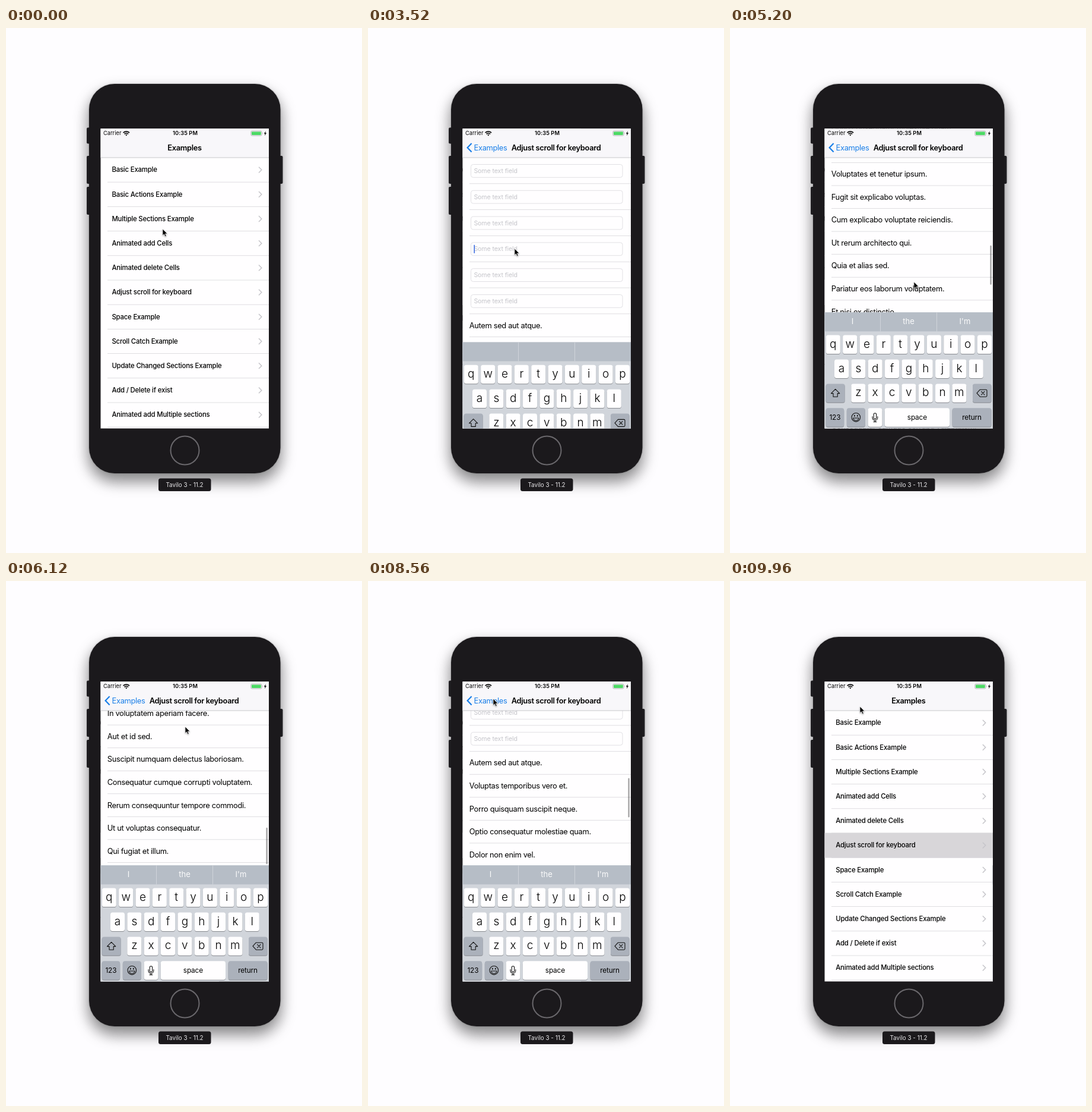
Write an HTML page that moves like this. It is 600 px wide and 883 px high and loops after 10 s.

```html
<!DOCTYPE html>
<html lang="en">
<head>
<meta charset="utf-8">
<title>Keyboard scroll demo</title>
<style>
  html, body { margin: 0; width: 100%; height: 100%; overflow: hidden; background: #fefdff; }
  svg { display: block; width: 600px; height: 883px; font-family: Inter, Roboto, "Liberation Sans", sans-serif; }
  .body { fill: #1b191c; filter: drop-shadow(0 13px 13px rgba(0, 0, 0, .4)) drop-shadow(0 0 1px rgba(0, 0, 0, .35)); }
  .side { fill: #29272b; }
  .paper { fill: #fffeff; }
  .line { fill: #d7d6da; }
  .menu { font-size: 11.34px; font-weight: 500; letter-spacing: -.17px; }
  .cell { font-size: 12.85px; letter-spacing: -.325px; }
  .title { font-size: 12.85px; font-weight: 600; letter-spacing: -.33px; }
  .hint { font-size: 10.58px; letter-spacing: -.1px; fill: #c5c5ca; }
  .field { fill: #fffeff; stroke: #e1e0e4; stroke-width: 1; }
  .key { fill: #fffeff; }
  .gray { fill: #abb1bb; }
  .under { fill: #898c91; }
  .letter { font-size: 19px; font-weight: 300; }
  .word { font-size: 11.8px; letter-spacing: -.15px; }
  .guess { font-size: 13px; fill: #fff; }
  .icon { fill: none; stroke: #111; stroke-width: 1.1; stroke-linejoin: round; stroke-linecap: round; }
  .mid { text-anchor: middle; }
  .blue { fill: #1a7fe8; }
</style>
</head>
<body>
<svg viewBox="0 0 600 883" xmlns="http://www.w3.org/2000/svg">
  <defs>
    <clipPath id="screen"><rect x="159.5" y="169.3" width="283.5" height="504.2"/></clipPath>
  </defs>

  <g class="side">
    <rect x="136" y="167.5" width="8" height="27" rx="2"/>
    <rect x="136" y="215" width="8" height="47" rx="2"/>
    <rect x="136" y="267" width="8" height="47" rx="2"/>
    <rect x="458" y="215" width="8.5" height="47" rx="2"/>
  </g>
  <rect class="body" x="140" y="94" width="322.5" height="655" rx="43"/>
  <circle cx="301.5" cy="710.5" r="24" fill="none" stroke="#6a686c" stroke-width="2"/>
  <rect x="257" y="757.5" width="88.5" height="21.5" rx="3.5" fill="#1b191c"/>
  <text class="mid" x="301" y="772.4" font-size="9.9" fill="#e9e8ea">Tavilo 3 - 11.2</text>

  <g clip-path="url(#screen)">
    <g id="list">
      <rect class="paper" x="159" y="169" width="285" height="505"/>
      <g id="menu"></g>
    </g>
    <rect id="dim" x="159" y="169" width="285" height="505"/>

    <g id="detail">
      <rect class="paper" x="159.5" y="169" width="284" height="505"/>
      <g id="rows"></g>
      <rect id="thumb" x="438.4" width="2.4" rx="1.2" fill="#000"/>
      <g id="keys">
        <rect x="159" y="478.3" width="285" height="196" fill="#d1d5db"/>
        <rect x="159" y="478.3" width="285" height="32" fill="#b6bdc6"/>
        <path d="M253.5 478.3v32M348.5 478.3v32" stroke="#cfd4da"/>
        <g id="guesses" class="guess mid">
          <text x="206.5" y="498">I</text><text x="301" y="498">the</text><text x="396" y="498">I'm</text>
        </g>
      </g>
    </g>

    <rect x="159" y="169" width="285" height="49" fill="#f8f7fa"/>
    <rect x="159" y="217.6" width="285" height=".8" fill="#bab9bd"/>
    <text x="164" y="180.4" font-size="9.2" letter-spacing=".05">Carrier</text>
    <g fill="none" stroke="#000" stroke-width="1.7">
      <path d="M197.6 176.2a7.6 7.6 0 0 1 10.4 0M199.5 178.4a4.8 4.8 0 0 1 6.6 0"/>
      <path d="M202.8 181.4l-1.5-1.7a2.2 2.2 0 0 1 3 0z" fill="#000" stroke="none"/>
    </g>
    <text class="mid" x="302" y="180.4" font-size="9.2" font-weight="600" letter-spacing=".12">10:35 PM</text>
    <rect x="412.8" y="173.3" width="18.2" height="7.8" rx="1.8" fill="none" stroke="#a2a1a5" stroke-width=".8"/>
    <rect x="414" y="174.5" width="15.8" height="5.4" rx=".8" fill="#4cd964"/>
    <path d="M432.2 175.8q1.2 1.3 0 2.8z" fill="#a2a1a5"/>
    <path d="M437.9 173.3l-3.1 4.5h1.9l-.8 3.4 3.2-4.6h-2z"/>
    <text id="head" class="title mid" x="301" y="205.8">Examples</text>
    <path id="arrow" d="M174.6 194l-7 7.2 7 7.2" fill="none" stroke="#1a7fe8" stroke-width="2.2"/>
    <text id="back" class="cell blue" x="178.6" y="205.8">Examples</text>
    <text id="head2" class="title mid" x="317" y="205.8">Adjust scroll for keyboard</text>
  </g>

  <path id="cursor" d="M0 0v11l2.5-2.3 1.8 4 1.9-.9-1.8-3.8h3.5z" fill="#000" stroke="#fff" stroke-width=".7"
    style="filter:drop-shadow(0 1px 1px rgba(0,0,0,.35))"/>
</svg>

<script>
const $ = id => document.getElementById(id);
const LOOP = 10000, TOP = 218, MENU_H = 41.2, FIELD_H = 43.8, CELL_H = 38.55, END = 773.8;

function add(parent, tag, attrs, text) {
  const el = document.createElementNS("http://www.w3.org/2000/svg", tag);
  for (const k in attrs) el.setAttribute(k, attrs[k]);
  if (text) el.textContent = text;
  parent.append(el);
  return el;
}
const rule = (parent, y) => add(parent, "rect", { class: "line", x: 171, y: y - .4, width: 273, height: .8 });

// Menu screen
const menu = $("menu");
const glow = add(menu, "rect", { x: 159, y: TOP + 5 * MENU_H - .4, width: 285, height: MENU_H + .8, fill: "#d8d6d9" });
["Basic Example", "Basic Actions Example", "Multiple Sections Example", "Animated add Cells",
 "Animated delete Cells", "Adjust scroll for keyboard", "Space Example", "Scroll Catch Example",
 "Update Changed Sections Example", "Add / Delete if exist", "Animated add Multiple sections"
].forEach((name, i) => {
  const y = TOP + MENU_H * (i + .5);
  add(menu, "text", { class: "menu", x: 178.4, y: y + 3.8 }, name);
  add(menu, "path", { d: `M426 ${y - 4.9}l4.8 4.9-4.8 4.9`, fill: "none", stroke: "#c6c5ca", "stroke-width": 1.5 });
  rule(menu, y + MENU_H / 2);
});
menu.append(glow.cloneNode());
const glowTop = menu.lastChild;
glowTop.remove();

// Detail screen
const rows = $("rows");
for (let i = 0; i < 6; i++) {
  const y = TOP + FIELD_H * i;
  add(rows, "rect", { class: "field", x: 173.5, y: y + 11.5, width: 255.5, height: 21.8, rx: 3.8 });
  add(rows, "text", { class: "hint", x: 178.4, y: y + 26 }, "Some text field");
  rule(rows, y + FIELD_H);
}
const caret = add(rows, "rect", { x: 178.4, y: TOP + 3 * FIELD_H + 15.4, width: 1.6, height: 14, fill: "#3f6fe3" });
["Autem sed aut atque.", "Voluptas temporibus vero et.", "Porro quisquam suscipit neque.",
 "Optio consequatur molestiae quam.", "Dolor non enim vel.", "Voluptates et tenetur ipsum.",
 "Fugit sit explicabo voluptas.", "Cum explicabo voluptate reiciendis.", "Ut rerum architecto qui.",
 "Quia et alias sed.", "Pariatur eos laborum voluptatem.", "Et nisi ex distinctio.",
 "Quo ea velit nihil.", "In voluptatem aperiam facere.", "Aut et id sed.",
 "Suscipit numquam delectus laboriosam.", "Consequatur cumque corrupti voluptatem.",
 "Rerum consequuntur tempore commodi.", "Ut ut voluptas consequatur.", "Qui fugiat et illum."
].forEach((name, i) => {
  const y = TOP + 6 * FIELD_H + CELL_H * i;
  add(rows, "text", { class: "cell", x: 170.8, y: y + 23.8 }, name);
  rule(rows, y + CELL_H);
});

// Keyboard
const keys = $("keys");
function key(x, row, w, label, type = "word", look = "key") {
  const y = 516.6 + 40.9 * row, h = 31.4;
  add(keys, "rect", { class: "under", x, y: y + 1, width: w, height: h, rx: 3.6 });
  add(keys, "rect", { class: look, x, y, width: w, height: h, rx: 3.6 });
  if (label) add(keys, "text", { class: type + " mid", x: x + w / 2, y: y + (type === "letter" ? 21 : 20) }, label);
}
const icon = (d, extra) => add(keys, "path", { class: "icon", d, ...extra });
[["qwertyuiop", 161.8], ["asdfghjkl", 176], ["zxcvbnm", 204.3]].forEach(([set, x], r) =>
  [...set].forEach((c, i) => key(x + 28.35 * i, r, 24, c, "letter")));
key(161.6, 2, 32, "", "word", "gray");
key(409, 2, 31.6, "", "word", "gray");
key(161.6, 3, 30.6, "123", "word", "gray");
key(196.8, 3, 31, "", "word", "gray");
key(232.6, 3, 23.8, "");
key(260.8, 3, 109.2, "space");
key(374.6, 3, 66, "return", "word", "gray");
icon("M177.6 607.4l7.2 7.2h-3.6v5.6h-7.2v-5.6h-3.6z");
icon("M421.4 608.2h10q1.6 0 1.6 1.6v8.8q0 1.6-1.6 1.6h-10l-5.4-6z");
icon("M423.6 611.4l5.4 5.4m0-5.4l-5.4 5.4");
icon("M205 654.8a7.3 7.3 0 1 1 14.6 0a7.3 7.3 0 1 1-14.6 0M207.6 656h9.4q-.6 4.2-4.7 4.2t-4.7-4.2z");
icon("M209.8 651.6v1.2m5-1.2v1.2", { style: "stroke-width:1.7" });
icon("M242.2 650a2.2 2.2 0 0 1 4.4 0v5.4a2.2 2.2 0 0 1-4.4 0zM240 653.6v2a4.4 4.4 0 0 0 8.8 0v-2M244.4 660v2.4m-2.4 0h4.8");

// Motion: [time, x, y, power]; no power means a smooth ease
const path = [
  [0, 264, 338], [640, 264, 437], [2280, 264, 437], [2600, 246.6, 370], [2800, 247, 371],
  [3640, 247, 371], [4040, 316, 455], [4080, 316, 455], [4400, 316, 255, 1], [4540, 316, 255],
  [5200, 310, 427], [5300, 309, 437], [5640, 302, 245, 1.4], [6700, 302, 245], [7100, 255, 250],
  [7150, 255, 250], [7350, 255, 346.8, 2.2], [7840, 216, 217], [8560, 211, 198],
  [9300, 211, 198], [9800, 219, 211], [LOOP, 219, 211]
];
const clamp = v => Math.min(1, Math.max(0, v));
const decay = ms => Math.exp(-ms / 500);
const spring = (ms, w) => {
  const x = Math.max(0, ms) / 1000 * w;
  return 1 - (1 + x) * Math.exp(-x);
};

function pointer(t) {
  const i = path.findIndex(p => p[0] > t);
  const [t0, x0, y0] = path[i - 1], [t1, x1, y1, pow] = path[i];
  const u = (t - t0) / (t1 - t0), e = pow ? u ** pow : u * u * (3 - 2 * u);
  return [x0 + (x1 - x0) * e, y0 + (y1 - y0) * e];
}

// Drag, glide, drag, glide into the end and bounce, drag back, glide
function scroll(t, y) {
  if (t < 4080) return 0;
  if (t < 4400) return 455 - y;
  if (t < 5300) return 200 + 309.6 * (1 - decay(t - 4400));
  if (t < 5640) return 458.4 + 437 - y;
  if (t < 5824) return 650.4 + 400 * (1 - decay(t - 5640));
  if (t < 7150) {
    const s = (t - 5824) / 1000;
    return END + 554 * s * Math.exp(-12.1 * s);
  }
  if (t < 7350) return END + 250 - y;
  return 147 + 530 * decay(t - 7350);
}

const move = (el, x, y) => el.setAttribute("transform", `translate(${x.toFixed(2)} ${y.toFixed(2)})`);
const fade = (el, o) => el.setAttribute("opacity", o.toFixed(3));

function draw(t) {
  const [x, y] = pointer(t);
  move($("cursor"), x, y);

  const p = t < 9160 ? spring(t - 1280, 10) : 1 - spring(t - 9160, 11);
  fade(glow, t >= 960 ? 1 : 0);
  move($("list"), -85 * p, 0);
  fade($("dim"), .1 * p);
  move($("detail"), 284 * (1 - p), 0);

  move($("head"), -95 * p, 0);
  fade($("head"), clamp(1 - 1.4 * p));
  move($("back"), 95 * (1 - p), 0);
  fade($("back"), clamp(1.4 * p - .4));
  fade($("arrow"), p);
  move($("head2"), 141 * (1 - p), 0);
  fade($("head2"), p);

  const s = scroll(t, y), over = Math.max(0, s - END);
  move(rows, 0, -s);
  fade(caret, t >= 3400 && (t - 3400) % 1000 < 600 ? 1 : 0);
  const thumb = $("thumb");
  thumb.setAttribute("y", 305 + .136 * Math.min(s, END) + over);
  thumb.setAttribute("height", 66 - over);
  const seen = t < 6900 ? clamp((t - 4080) / 80) * clamp((6700 - t) / 250)
                        : clamp((t - 7150) / 80) * clamp((9250 - t) / 250);
  fade(thumb, .36 * seen);

  move(keys, 0, 196 * (1 - spring(t - 3380, 19)));
  fade($("guesses"), t >= 3720 ? .95 : 0);
}

const start = performance.now();
function tick() {
  const t = Math.max(0, performance.now() - start) % LOOP;
  draw(Math.floor(t / 40) * 40);
  requestAnimationFrame(tick);
}
tick();
</script>
</body>
</html>
```
